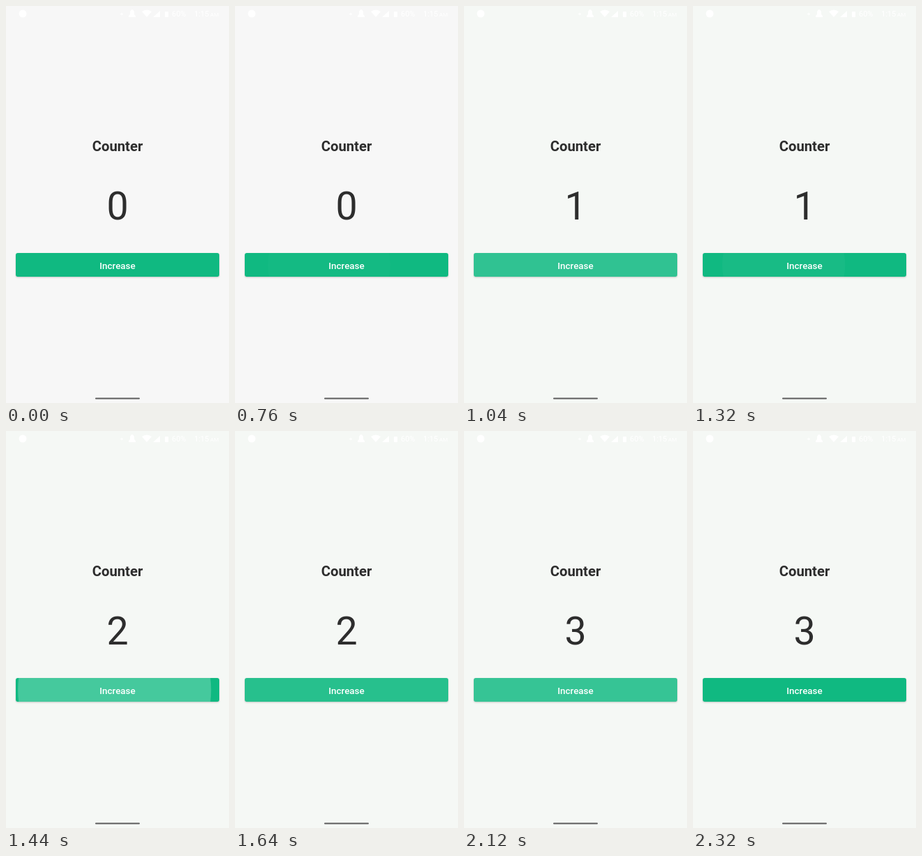
Recreate the animation shown at these times as an HTML page. Size 320 px wide and 569 px high, loop 3.76 s.

```html
<!DOCTYPE html>
<html lang="en">
<head>
<meta charset="utf-8">
<title>Counter</title>
<style>
  html, body { margin: 0; width: 100%; height: 100%; overflow: hidden; background: #f7f7f7; }
  svg { display: block; width: 100%; height: 100%; }
  text { font-family: Roboto, "Open Sans", sans-serif; text-anchor: middle; fill: #2d2d2d; }
  .title { font-size: 20.3px; font-weight: 700; }
  .count { font-size: 55.5px; font-weight: 400; }
  .label { font-size: 13.4px; font-weight: 500; fill: #fff; }
  .status text { font-size: 11px; text-anchor: start; fill: #fff; }
  .button { filter: drop-shadow(0 1px 1px rgba(0, 0, 0, .2)); }
</style>
</head>
<body>
<svg viewBox="0 0 320 569">
  <defs>
    <clipPath id="buttonShape"><rect x="14" y="354" width="292" height="34" rx="3"/></clipPath>
  </defs>
  <rect id="page" width="320" height="569"/>

  <g class="status" fill="#fff">
    <circle cx="24" cy="11" r="5.5"/>
    <path d="M164 11.5h4M166 9.5v4" stroke="#fff"/>
    <path d="M176 16v-2l2-2V8q3-6 6 0v4l2 2v2z"/>
    <path d="M195 8q7-5 14 0l-7 8z"/>
    <path d="M211 16l10-9v9z"/>
    <rect x="228" y="8" width="5" height="8" rx="1"/>
    <text x="238" y="15">60%</text>
    <text x="270" y="15">1:15</text>
    <text x="293" y="15" style="font-size:8px">AM</text>
  </g>

  <text class="title" x="160" y="208">Counter</text>
  <text class="count" id="count" x="160" y="305.5">0</text>
  <rect class="button" x="14" y="354" width="292" height="34" rx="3" fill="#10b981"/>
  <g clip-path="url(#buttonShape)"><circle id="ripple" cy="371" fill="#fff"/></g>
  <text class="label" x="160" y="377">Increase</text>
  <rect x="128" y="561.5" width="64" height="2" rx="1" fill="#5c5c5c"/>
</svg>
<script>
const LOOP = 3760, STEP = 40;
const ENTER = 225, FADE_IN = 75, MAX_ALPHA = 0.222;
const START_RADIUS = 88, END_RADIUS = 147, CENTER = 160;

const presses = [
  { start: 755, counted: 880, release: 910, end: 1230, x: 135 },
  { start: 1310, counted: 1440, release: 1480, end: 1760, x: 130 },
  { start: 1821, counted: 1960, release: 2040, end: 2310, x: 135 }
];

const page = document.getElementById("page");
const count = document.getElementById("count");
const ripple = document.getElementById("ripple");

const clamp = v => Math.min(1, Math.max(0, v));
const mix = (a, b, p) => a + (b - a) * p;

// Material standard easing: cubic-bezier(.4, 0, .2, 1)
function standardEase(x) {
  let low = 0, high = 1;
  for (let i = 0; i < 20; i++) {
    const s = (low + high) / 2, r = 1 - s;
    if (1.2 * r * r * s + 0.6 * r * s * s + s ** 3 < x) low = s;
    else high = s;
  }
  return low * low * (3 - 2 * low);
}

function draw(time) {
  page.setAttribute("fill", time < 800 ? "#f7f7f7" : "#f5f8f5");
  count.textContent = presses.filter(p => time >= p.counted).length;

  const press = presses.find(p => time >= p.start && time < p.end);
  if (!press) {
    ripple.setAttribute("opacity", 0);
    return;
  }
  const age = time - press.start;
  const grown = standardEase(clamp(age / ENTER));
  const faded = clamp((time - press.release) / (press.end - press.release));
  ripple.setAttribute("cx", mix(press.x, CENTER, grown));
  ripple.setAttribute("r", mix(START_RADIUS, END_RADIUS, grown));
  ripple.setAttribute("opacity", MAX_ALPHA * clamp(age / FADE_IN) * (1 - faded));
}

const began = performance.now();
function tick() {
  const time = Math.max(0, performance.now() - began) % LOOP;
  draw(Math.floor(time / STEP) * STEP);
  requestAnimationFrame(tick);
}
tick();
</script>
</body>
</html>
```
